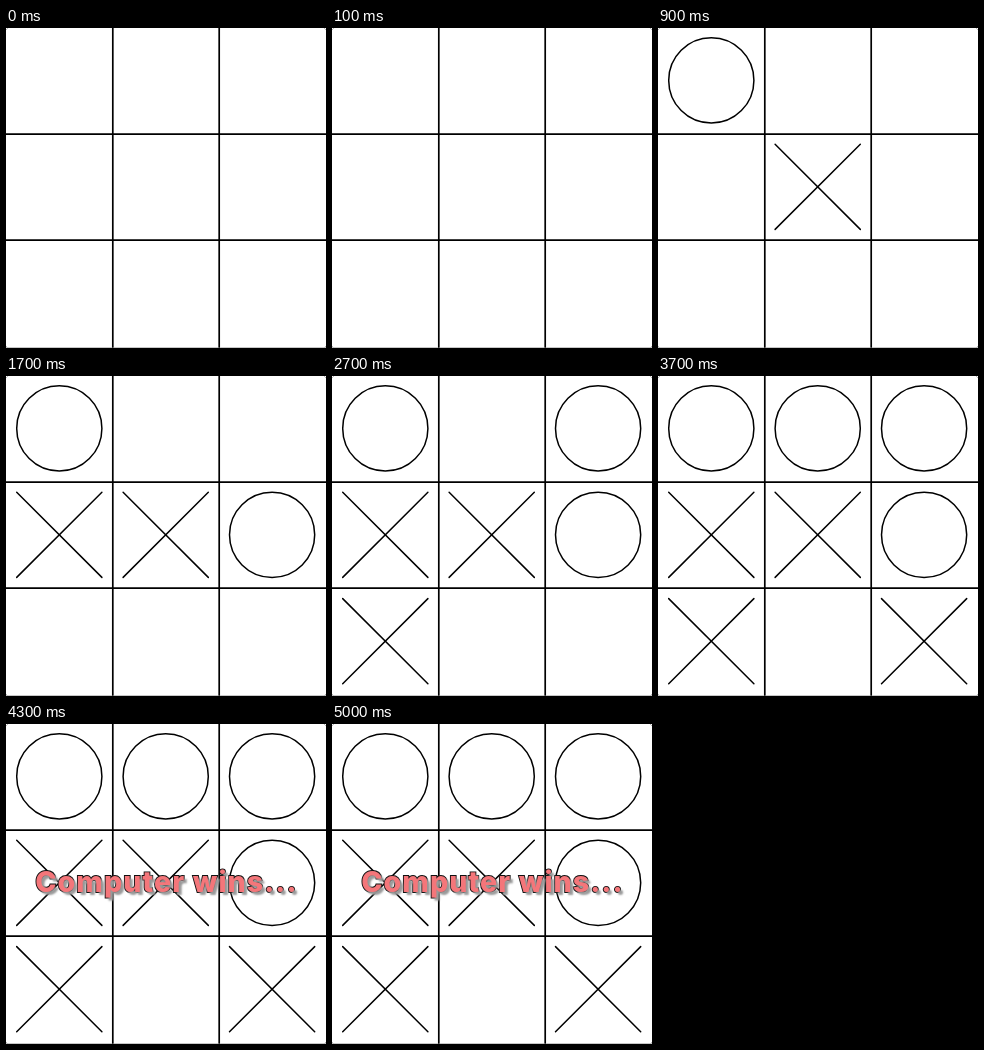
An HTML page with a canvas that plays this animation: 320x320 px, repeating every 5.1 s.

```html
<!DOCTYPE html>
<html lang="en">
<head>
<meta charset="utf-8">
<title>Noughts and crosses</title>
<style>
  html, body { margin: 0; width: 100%; height: 100%; overflow: hidden; background: #fff; }
  #stage { position: relative; width: 320px; height: 320px; overflow: hidden; contain: strict; }
  canvas { display: block; width: 320px; height: 320px; }
  #result {
    position: absolute; left: 1px; top: 138px; width: 319px;
    font: 800 28.5px/40px Inter, "Open Sans", sans-serif;
    letter-spacing: 1.1px;
    text-align: center; white-space: nowrap;
    color: #f4767a;
    -webkit-text-stroke: 1.8px #111; paint-order: stroke fill;
    text-shadow: 3px 3px 2px #999;
    opacity: 0;
  }
</style>
</head>
<body>
<div id="stage">
  <canvas id="board"></canvas>
  <div id="result">Computer wins...</div>
</div>
<script>
const LOOP = 5100;
const SIZE = 320;
const CELL = 106.4;
const R = 42.6;

// [time, mark, column, row]
const MOVES = [
  [800, "X", 1, 1], [900, "O", 0, 0],
  [1700, "X", 0, 1], [1700, "O", 2, 1],
  [2700, "X", 0, 2], [2700, "O", 2, 0],
  [3700, "X", 2, 2], [3700, "O", 1, 0]
];
const FADE_START = 4100;

const canvas = document.getElementById("board");
const result = document.getElementById("result");
const ctx = canvas.getContext("2d");
const dpr = window.devicePixelRatio || 1;
canvas.width = canvas.height = SIZE * dpr;
ctx.scale(dpr, dpr);
ctx.lineCap = "round";

function line(x1, y1, x2, y2) {
  ctx.beginPath();
  ctx.moveTo(x1, y1);
  ctx.lineTo(x2, y2);
  ctx.stroke();
}

function drawGrid() {
  ctx.fillStyle = "#fff";
  ctx.fillRect(0, 0, SIZE, SIZE);

  ctx.strokeStyle = "#bbb";
  ctx.lineWidth = 1;
  line(0, 319.7, SIZE, 319.7);
  for (const x of [0, SIZE]) {
    const d = x ? -2 : 2;
    line(x, 2, x + d, 0);
    line(x, SIZE - 2, x + d, SIZE);
  }

  ctx.strokeStyle = "#000";
  ctx.lineWidth = 1.7;
  for (let i = 1; i < 3; i++) {
    const x = i * CELL + 0.4, y = i * 106.05;
    line(x, 0, x, SIZE - 1);
    line(0, y, SIZE, y);
  }
}

function drawMark(mark, col, row) {
  const x = 53.3 + col * CELL, y = 52.4 + row * CELL;
  ctx.lineWidth = 1.5;
  if (mark === "X") {
    line(x - R, y - R, x + R, y + R);
    line(x + R, y - R, x - R, y + R);
  } else {
    ctx.beginPath();
    ctx.arc(x, y, R, 0, Math.PI * 2);
    ctx.stroke();
  }
}

function render(t) {
  drawGrid();
  for (const [at, mark, col, row] of MOVES) {
    if (t >= at) drawMark(mark, col, row);
  }

  // The caption appears half faded, then settles in steps.
  const step = Math.min(2, Math.floor((t - FADE_START) / 100));
  result.style.opacity = step < 0 ? 0 : [0.66, 0.88, 1][step];
  result.style.transform = `translateX(${step < 0 ? 2 : 2 - step}px)`;
}

const start = performance.now();
function tick() {
  render((performance.now() - start) % LOOP);
  requestAnimationFrame(tick);
}
tick();
</script>
</body>
</html>
```
